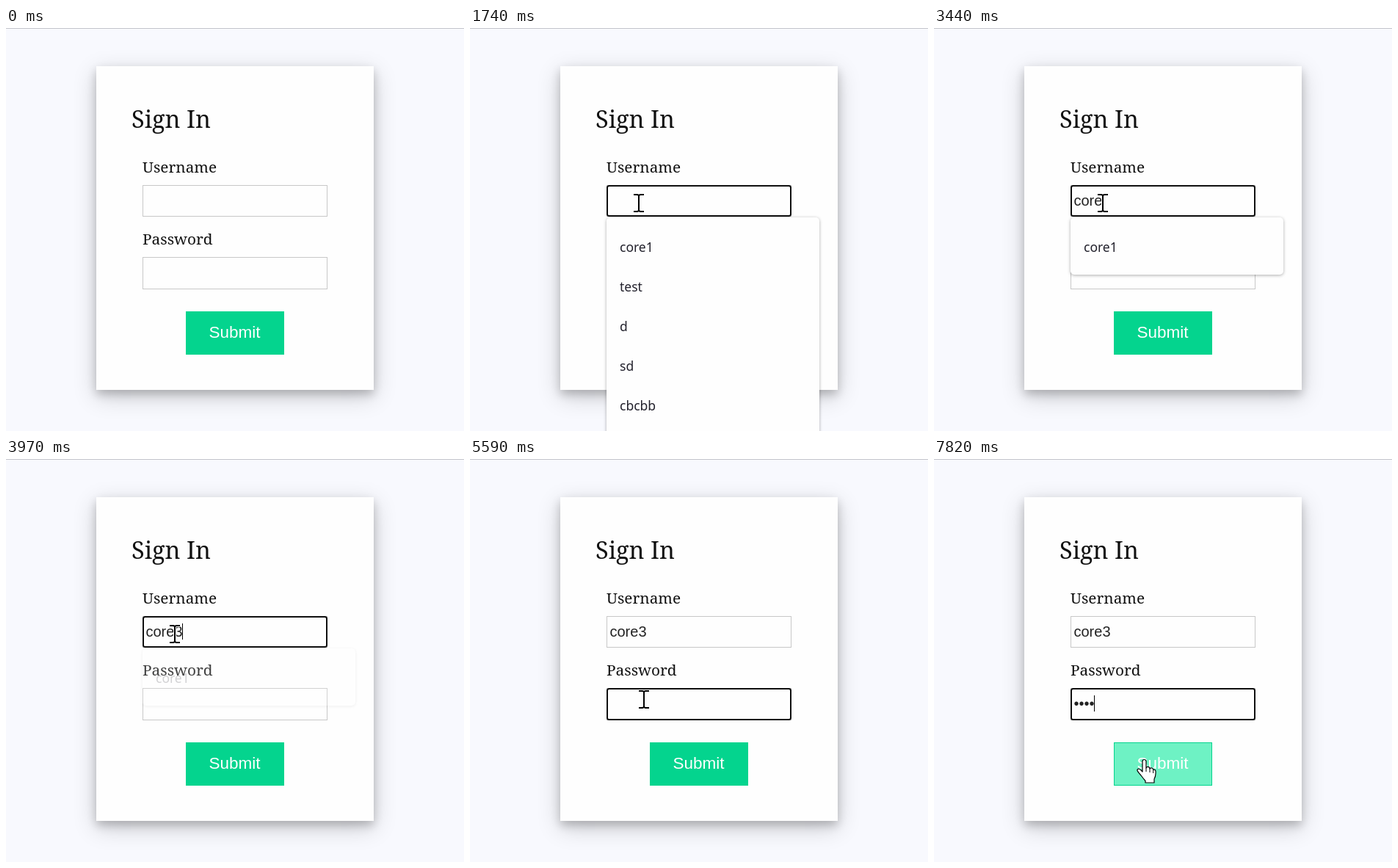
Recreate the animation shown at these times as an HTML page. Size 624 by 549 pixels, loop 8 s.

```html
<!DOCTYPE html>
<html lang="en">
<head>
<meta charset="utf-8">
<title>Sign In form</title>
<style>
  html, body { margin: 0; width: 100%; height: 100%; overflow: hidden; background: #f8f9fe; }
  #stage { position: relative; width: 624px; height: 549px; overflow: hidden; }
  #card {
    position: absolute; left: 123px; top: 52px; width: 378px; height: 441px; background: #fefefe;
    box-shadow: 0 6px 12px rgba(0, 0, 0, .2), 0 9px 30px rgba(0, 0, 0, .19);
  }
  svg { position: absolute; left: 0; top: 0; }
  .serif { font-family: "Noto Serif", serif; fill: #111; }
  .sans { font-family: "Liberation Sans", Arial, sans-serif; font-size: 20px; fill: #222; }
  .list { font: 500 17.5px "Noto Sans", sans-serif; fill: #23222d; }
  .field { fill: #fefefe; stroke: #c8c8c8; stroke-width: 1; }
  .focus { fill: none; stroke: #101010; stroke-width: 2; }
  #menu rect { fill: #fefefe; filter: drop-shadow(0 1px 2px rgba(0, 0, 0, .32)); }
  .pointer { fill: #fff; stroke: #000; stroke-width: 1.2; stroke-linejoin: round; }
</style>
</head>
<body>
<div id="stage">
  <div id="card"></div>
  <svg width="624" height="549" viewBox="0 0 624 549">
    <rect width="624" height="1" fill="#c3c4ca"/>
    <text class="serif" x="171" y="136" font-size="32.5">Sign In</text>
    <text class="serif" x="186" y="197" font-size="20.8">Username</text>
    <text class="serif" x="186" y="295" font-size="20.8">Password</text>

    <rect class="field" x="186.5" y="214.5" width="251" height="42"/>
    <rect class="field" x="186.5" y="312.5" width="251" height="43"/>
    <rect id="focusUser" class="focus" x="187" y="215" width="250" height="41" rx="2.5"/>
    <rect id="focusPass" class="focus" x="187" y="313" width="250" height="42" rx="2.5"/>
    <text id="user" class="sans" x="190.5" y="242"></text>
    <text id="pass" class="sans" x="190.5" y="340"></text>
    <rect id="caret" width="1" height="22" fill="#000"/>

    <rect id="button" x="245.5" y="386.5" width="133" height="58" stroke="#04d48e"/>
    <text class="sans" x="276.5" y="422" style="font-size:22.5px;fill:#fff">Submit</text>

    <g id="menu">
      <rect id="menuBox" x="186" y="258" width="290" rx="5"/>
      <text class="list" x="204" y="305">core1</text>
      <g id="others" class="list"></g>
    </g>

    <circle id="click" r="18" fill="#ff0" fill-opacity=".47"/>
    <g id="cursor">
      <g id="beam" fill="none" stroke-linecap="butt">
        <g id="beamLine" transform="translate(3 1.5)">
          <path d="M-7-11.5H-2L0-10.5L2-11.5H7M0-10.5V10.5M-7 11.5H-2L0 10.5L2 11.5H7" stroke="#fff" stroke-width="4"/>
          <path d="M-7-11.5H-2L0-10.5L2-11.5H7M0-10.5V10.5M-7 11.5H-2L0 10.5L2 11.5H7" stroke="#000" stroke-width="2"/>
        </g>
      </g>
      <path id="arrow" class="pointer" d="M.5.5V23.5L5.8 18.6L9.4 26.5L13 25L9.5 17.2H17.3Z"/>
      <g id="hand">
        <path class="pointer" d="M-2 2Q-2-.5 .5-.5Q3-.5 3 2V11Q3.5 9 6 9.4Q8 9.8 8 12Q9 10.4 11 11Q12.7 11.5 12.7 13.5Q14.7 12.6 15.7 14.3Q16.3 15.5 16 18.5Q15.8 23 14 26V31H2V28.5Q-1 25-4 21Q-8 16.5-9 14.5Q-9.4 12.6-7.5 12Q-5.5 12-2 16Z"/>
        <path d="M3 11V16M8 12V17M12.7 13.5V18" stroke="#000" fill="none"/>
      </g>
    </g>
  </svg>
</div>
<script>
const LOOP = 8000, BLINK = 510;
const $ = id => document.getElementById(id);
const show = (id, on) => $(id).setAttribute('visibility', on ? 'visible' : 'hidden');
const set = (id, attrs) => { for (const k in attrs) $(id).setAttribute(k, attrs[k]); };

const USER_KEYS = [2070, 2350, 2680, 2930, 3770];
const PASS_KEYS = [5770, 6020, 6530, 6780];
const FOCUS_USER = 1210, FOCUS_PASS = 5060;

// Pointer hot spot: time, x, y
const PATH = [
  [220, 529, 533], [400, 437, 452], [550, 335, 352], [700, 263, 286],
  [850, 236, 255], [980, 228, 239], [1030, 227, 237],
  [4300, 227, 237], [4450, 229, 258], [4580, 233, 290], [4680, 234, 308],
  [4790, 234, 321], [4880, 234, 326],
  [7290, 234, 326], [7420, 245, 346], [7560, 266, 380], [7700, 281, 403], [7820, 286, 410]
];

['test', 'd', 'sd', 'cbcbb'].forEach((word, i) => {
  const line = document.createElementNS('http://www.w3.org/2000/svg', 'text');
  line.setAttribute('x', 204);
  line.setAttribute('y', 359 + i * 54);
  line.textContent = word;
  $('others').append(line);
});

function pointerAt(t) {
  const i = PATH.findIndex(p => p[0] > t);
  if (i < 0) return PATH[PATH.length - 1].slice(1);
  const [t0, x0, y0] = PATH[i - 1], [t1, x1, y1] = PATH[i];
  const u = (t - t0) / (t1 - t0);
  return [x0 + (x1 - x0) * u, y0 + (y1 - y0) * u];
}

const inside = (x, y, l, t, r, b) => x >= l && x < r && y >= t && y < b;
const typed = (keys, t) => keys.filter(k => k <= t).length;

function drawFields(t) {
  const onPass = t >= FOCUS_PASS, focused = t >= FOCUS_USER;
  $('user').textContent = 'core3'.slice(0, typed(USER_KEYS, t));
  $('pass').textContent = '•'.repeat(typed(PASS_KEYS, t));
  show('focusUser', focused && !onPass);
  show('focusPass', onPass);

  const last = Math.max(...[FOCUS_USER, FOCUS_PASS, ...USER_KEYS, ...PASS_KEYS].filter(k => k <= t));
  const width = $(onPass ? 'pass' : 'user').getComputedTextLength();
  set('caret', { x: Math.round(190.7 + width - .3), y: onPass ? 322 : 224 });
  show('caret', focused && Math.floor((t - last) / BLINK) % 2 === 0);
}

function drawMenu(t) {
  const full = t < USER_KEYS[0];
  const fade = Math.min(1, Math.max(0, (4020 - t) / 250));
  set('menu', { opacity: t >= 1260 ? fade : 0 });
  set('menuBox', { height: full ? 310 : 78 });
  $('others').setAttribute('display', full ? 'inline' : 'none');
}

function drawPointer(t) {
  const visible = t >= PATH[0][0];
  const [x, y] = visible ? pointerAt(t) : [0, 0];
  const overField = inside(x, y, 186, 214, 438, 257) || inside(x, y, 186, 312, 438, 356);
  const overButton = inside(x, y, 245, 386, 379, 445);
  set('cursor', { transform: `translate(${Math.round(x)} ${Math.round(y)})` });
  show('beam', visible && overField);
  show('hand', visible && overButton);
  show('arrow', visible && !overField && !overButton);
  set('button', { fill: overButton ? '#6ef2c4' : '#04d48e' });
  set('click', { cx: x, cy: y });
  show('click', [FOCUS_USER, FOCUS_PASS].some(c => t >= c && t < c + 250));
}

function draw(t) {
  drawFields(t);
  drawMenu(t);
  drawPointer(t);
}

const start = performance.now();
function tick() {
  draw((performance.now() - start) % LOOP);
  requestAnimationFrame(tick);
}
tick();
</script>
</body>
</html>
```
